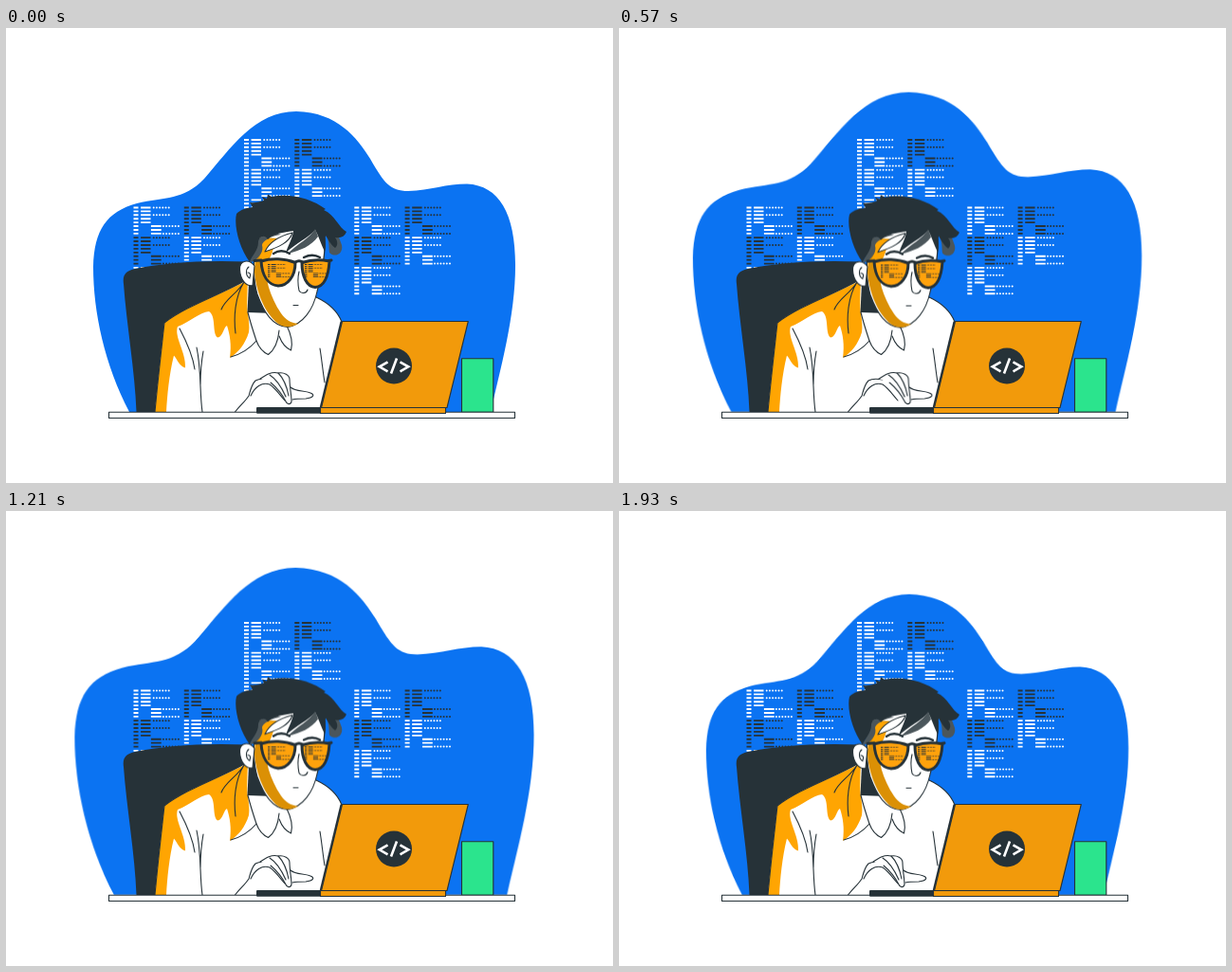
These frames come from a looping animation (640x480 px, 2 s). An HTML page:

```html
<!DOCTYPE html>
<html lang="en">
<head>
<meta charset="utf-8">
<title>Coder at work</title>
<style>
  html, body { margin: 0; width: 100%; height: 100%; overflow: hidden; background: #fff; }
  svg { display: block; width: 100%; height: 100%; }

  .dark { fill: #263238; }
  .gray { fill: #4b565b; }
  .white { fill: #fff; }
  .amber { fill: #ffa502; }
  .shade { fill: #db9005; }
  .panel { fill: #f29a0b; }
  .line { stroke: #263238; stroke-width: 1.1; stroke-linejoin: round; stroke-linecap: round; }
  .brow { stroke-width: 2.4; }
  .frame { stroke-width: 3; }
  .open { fill: none; }
  .ink { stroke: #263238; }
  .chalk { stroke: #fff; }

  .blob { fill: #0b73f2; transform-origin: 314.5px 408px; animation: grow 2s -15ms infinite; }
  .head { animation: nod 2s ease-in-out infinite; }
  .fingers { animation: type 2s infinite; }

  @keyframes grow {
    0%, 100% { transform: scale(1); animation-timing-function: cubic-bezier(.37, 0, .63, 1); }
    50% { transform: scale(1.1); animation-timing-function: cubic-bezier(.37, 0, .63, 1); }
  }
  @keyframes nod {
    0%, 100% { transform: translateY(0); }
    14.3% { transform: translateY(5px); }
    28.6% { transform: translateY(.5px); }
    46.4% { transform: translateY(-2.3px); }
    71.4% { transform: translateY(.5px); }
    85.7% { transform: translateY(-4.6px); }
    96.4% { transform: translateY(-.3px); }
  }
  @keyframes type {
    0% { transform: translateX(0); animation-timing-function: ease-out; }
    21%, 28% { transform: translateX(6.2px); animation-timing-function: ease-in; }
    50%, 100% { transform: translateX(0); }
  }
</style>
</head>
<body>
<svg viewBox="0 0 640 480">
  <defs>
    <!-- One paragraph of code; the colour comes from the stroke of each use -->
    <g id="code" fill="none">
      <path d="M2.5 0V29.3" stroke-width="5" stroke-dasharray="1.9 2.02"/>
      <path d="M12.8 0V17.7" stroke-width="10.4" stroke-dasharray="1.9 2.02"/>
      <path d="M23.8 19.6V29.4" stroke-width="10.8" stroke-dasharray="1.9 2.02"/>
      <path d="M21.2 1H37.8M21.2 8.8H37.800M31.4 20.600H48M31.4 28.4H48" stroke-width="2" stroke-linecap="round" stroke-dasharray="0 3.2"/>
    </g>
  </defs>

  <path class="blob" d="M130 405C104 355 92 300 92 252C93 213 106 194 138 185C168 178 187 182 209 159
    C237 127 262 88 306 88C350 89 370 116 384 138C399 164 405 172 424 172C448 171 464 164.500 486 164.500
    C520 166 537 196 537 250C537 305 521 360 511 405Z"/>

  <g class="chalk">
    <use href="#code" x="251" y="117"/>
    <use href="#code" x="251" y="148.7"/>
    <use href="#code" x="304.3" y="148.7"/>
    <use href="#code" x="251" y="180.4"/>
    <use href="#code" x="134.5" y="188.5"/>
    <use href="#code" x="187.8" y="220.2"/>
    <use href="#code" x="134.5" y="251.9"/>
    <use href="#code" x="367.3" y="188.5"/>
    <use href="#code" x="420.6" y="220.2"/>
    <use href="#code" x="367.3" y="251.9"/>
  </g>
  <g class="ink">
    <use href="#code" x="304.3" y="117"/>
    <use href="#code" x="187.8" y="188.5"/>
    <use href="#code" x="134.5" y="220.2"/>
    <use href="#code" x="420.6" y="188.5"/>
    <use href="#code" x="367.3" y="220.2"/>
  </g>

  <!-- Chair -->
  <path class="dark" d="M137.500 405C136 362 127 312 124 270C122.500 260 127 256 136 254C165 248 205 244.500 254 246.500L290 300L200 405Z"/>

  <!-- Shirt -->
  <path class="white" d="M157 405C160 372 164 338 167 311C190 293 225 282 253 266L280 301L327 284C342 291 350 300 354 310L331 405Z"/>
  <path class="amber" d="M157 405C160 372 164 338 167 311C190 293 225 282 255 266C254 285 254 297 255 301
    C256 309 257 314 256 321C252 334 245 342 236 348C238 334 236 323 233 314C229 316 229 326 223 326.500
    C217 322 222 304 214 299C204 300 194 310 181 315C177 326 190 342 189 358.500C182 356 181 350 177 345.500
    C172 365 170 388 169 405Z"/>
  <path class="dark" d="M256 268L254.500 300L283 301L278 280Z"/>
  <g class="line open">
    <path d="M157 405C160 372 164 338 167 311C190 293 225 282 253 266"/>
    <path d="M327 284C342 291 350 300 354 310"/>
    <path d="M227 297C231 286 244 280 251 268C241 284 240 306 242 322"/>
    <path d="M255 300C258 312 261 321 264 330C267 338 271 342 276.500 344.500C284 339 287 330 288 319"/>
    <path d="M264 330C258 337 248 344 237 347"/>
    <path d="M288 325C291 333 296 338 300.500 340C303 331 300 322 296 314"/>
    <path d="M183 317C191 332 197 346 199 360M201 337C206 360 204 384 207 405M208 341C206 352 205 364 205 376"/>
    <path d="M331 338C333 350 334 362 336 374"/>
  </g>

  <!-- Hand -->
  <path class="line open" d="M241.500 405C248 397 253 393 256 388C258 381 259 376 263 372C268 369 273 370 278 371"/>
  <g class="fingers">
    <path class="white line" d="M300 379C306 384 314 382 321 385C326 387 324 390 316 391C310 391 306 391 302 392"/>
    <path class="white line" d="M268 370C274 366 280 362 287 364C293 363 299 366 299 371C299 378 301 388 301 394C300 398 296 397 295 394C292 388 286 380 279 374"/>
    <path class="line open" d="M287 364C293 370 296 378 298 388M278 366C286 371 291 380 295 389"/>
  </g>
  <path class="line open" d="M258 388C262 379 270 373 278 376C284 380 288 386 294 393"/>

  <g class="head">
    <!-- Face -->
    <path class="white line" d="M264 225C260 245 261 268 265 281C272 300 281 315 297 315.500C313 313 324 297 328 278C333 258 337 240 336 222L318 200H272Z"/>
    <path class="shade" d="M268 221L288 222C280 229 283 238 275 247C272 262 278 283 290 301C295 308 300 311 308 312
      C302 316 294 316.500 287 312C272 300 264 278 262 258C262 246 264 232 268 221Z"/>
    <path class="amber" d="M270 222L287 223C280 231 282 238 277 243L266 244C272 236 267 229 270 222Z"/>
    <path class="white line" d="M262 251C256 243 246 245 246.500 255C247 265 253 273 260 271.500Z"/>
    <path class="line open" d="M257 264C252 261 253 254 256 252M255 258C258 258 258 261 257 263"/>

    <!-- Hair -->
    <path class="gray" d="M257 247C260 238 266 233 264 225L276 214L290 218C280 219 270 225 270 229C272 236 267 241 262 246Z"/>
    <path class="gray" d="M336 214C342 227 340 232 341 237C347 243 356 238 354 229L350 218Z"/>
    <path class="dark" d="M257 247C246 232 240 209 243 196C248 191 254 190 260 189L257 184C263 185 267 183 272 182
      L270 178L275 180L276 175.500L280 178C300 174 322 180 337 191L335 192C347 197 351 211 359 215
      C357 220 353 222 347 221C350 225 350 229 347 232C341 227 340 223 337 219C336 225 338 230 336 236
      C332 228 330 220 326 213C318 222 307 226 295 237C298 228 302 222 303 214C290 216 281 217 276 223
      C272 216 266 222 266 226C266 235 259 240 257 247Z"/>
    <path class="gray" d="M326 212C320 222 308 227 297 238C310 235 322 230 329 220Z"/>
    <path class="white line" d="M273 236C278 225 290 219 302 216C299 226 288 231 273 236Z"/>
    <path class="line open brow" d="M282 238C288 234 294 235 299 238M314 242C320 239 326 239 331 242"/>

    <!-- Nose and mouth -->
    <path class="line open" d="M309 257C307 265 308 272 309 277C311 281 317 280 318 276M303 292.500H308"/>

    <!-- Glasses -->
    <g class="line frame" fill="#ffa20c">
      <path d="M269 246C280 242.500 294 243 305 247.500C305 262 297 272 287 272C276 271 270 261 269 246Z"/>
      <path d="M312 247.500C322 244 332 244 341 246C340 261 336 273 326 273.500C317 273 312 262 312 247.500Z"/>
      <path class="open" d="M262 245.500L269 245M305 247Q309 244.500 313 247M340 245.500L343 245"/>
    </g>
    <g class="ink">
      <use href="#code" transform="translate(276 249) scale(.48)"/>
      <use href="#code" transform="translate(315 249) scale(.48)"/>
    </g>
  </g>

  <!-- Desk -->
  <rect class="line" x="480.500" y="348.700" width="33.300" height="56.500" fill="#2be48d"/>
  <rect class="white line" x="108.500" y="405.200" width="428" height="6.300"/>
  <rect class="dark" x="264" y="400" width="68" height="6.700" rx="1"/>
  <path class="dark" d="M352.500 309.500H356L334 401H330.500Z"/>
  <path class="panel line" d="M354.500 309.500H487.300L465 400.500H332.500Z"/>
  <rect class="panel line" x="331.500" y="400.500" width="132" height="6"/>
  <circle class="dark" cx="409" cy="356.500" r="19"/>
  <path class="open chalk" stroke-width="2.600" d="M402.500 352.300L393.800 357.300L402.500 362.300M412 348.500L406 364.500M415.500 352.300L424.200 357.300L415.500 362.300"/>
</svg>
</body>
</html>
```
